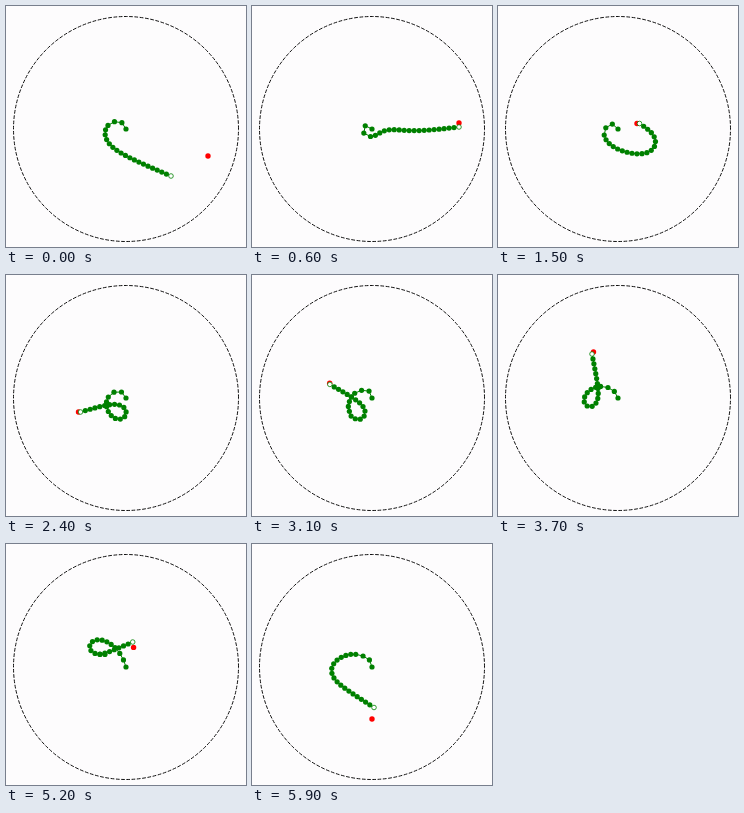
An HTML page with a canvas that plays this animation: 240x241 px, repeating every 6 s.

```html
<!DOCTYPE html>
<html>
<head>
<meta charset="utf-8">
<title>Chain reaching for a target</title>
<style>
html, body { margin: 0; width: 100%; height: 100%; overflow: hidden; background: #fdfcfd; }
canvas { display: block; }
</style>
</head>
<body>
<canvas id="stage" width="240" height="241"></canvas>
<script>
const ctx = document.getElementById('stage').getContext('2d');
const LOOP = 6000, STEP = 100;
const ROOT = [120, 123], REACH = 112.5;
const GREEN = '#008000', PAPER = '#fdfcfd';
const lengths = Array.from({ length: 21 }, (_, i) => i < 3 ? 7.5 : 5);

// time, target x y, tip x y, then in degrees: first angle, bend at the root,
// turn of the loop, and last the link at the middle of the loop
const keys = [
  [0, 202, 150, 165, 170, -118, -170, -50, 4.7],
  [600, 207, 117, 207, 121, -162, -380, 178, 5],
  [1500, 139, 117.5, 141.5, 117.5, -140, -210, -165, 14.5],
  [2400, 72.5, 137, 74.5, 137, -130, -190, -238, 10],
  [3700, 95.5, 77, 94, 79, -113, -120, -225, 8.5],
  [4500, 129, 48, 126, 48, -86, -20, -330, 8.6],
  [5900, 120, 175, 122, 163.5, -120, -100, -105, 8.7]
];

// Smooth curve through the keys
function sample(t) {
  const last = keys.length - 1;
  let i = 0;
  while (i < last - 1 && t > keys[i + 1][0]) i++;
  const a = keys[i], b = keys[i + 1], span = b[0] - a[0], u = (t - a[0]) / span;
  const slope = (k, c) => {
    const p = keys[Math.max(0, k - 1)], n = keys[Math.min(last, k + 1)];
    return (n[c] - p[c]) / (n[0] - p[0]) * span;
  };
  return a.slice(1).map((v, j) => {
    const c = j + 1, d = b[c] - v, m = slope(i, c), n = slope(i + 1, c);
    return v + u * (m + u * (3 * d - 2 * m - n + u * (m + n - 2 * d)));
  });
}

// Point at the given distance from a, in the direction of b
function along(a, b, dist) {
  const dx = b[0] - a[0], dy = b[1] - a[1], k = dist / (Math.hypot(dx, dy) || 1);
  return [a[0] + dx * k, a[1] + dy * k];
}

function chain(tip, first, bend, turn, middle) {
  const n = lengths.length;
  let joints = [ROOT];
  lengths.forEach((len, i) => {
    const degrees = first + bend * (1 - Math.exp(-i / 3)) + turn / (1 + Math.exp((middle - i) / 1.3));
    const a = degrees * Math.PI / 180, [x, y] = joints[i];
    joints.push([x + len * Math.cos(a), y + len * Math.sin(a)]);
  });
  // Spread the tip error over the chain, then restore the link lengths
  const ex = tip[0] - joints[n][0], ey = tip[1] - joints[n][1];
  joints = joints.map(([x, y], i) => [x + ex * i / n, y + ey * i / n]);
  for (let pass = 0; pass < 12; pass++) {
    joints[n] = tip;
    for (let i = n - 1; i >= 0; i--) joints[i] = along(joints[i + 1], joints[i], lengths[i]);
    joints[0] = ROOT;
    for (let i = 0; i < n; i++) joints[i + 1] = along(joints[i], joints[i + 1], lengths[i]);
  }
  return joints;
}

function dot([x, y], r, fill) {
  ctx.beginPath();
  ctx.arc(x, y, r, 0, 2 * Math.PI);
  ctx.fillStyle = fill;
  ctx.fill();
}

function draw(t) {
  const [targetX, targetY, tipX, tipY, ...pose] = sample(t);
  const joints = chain([tipX, tipY], ...pose);

  ctx.fillStyle = PAPER;
  ctx.fillRect(0, 0, 240, 241);

  ctx.lineWidth = 1;
  ctx.strokeStyle = '#111';
  ctx.setLineDash([3.7, 1.6]);
  ctx.beginPath();
  ctx.arc(...ROOT, REACH, 0, 2 * Math.PI, true);
  ctx.stroke();
  ctx.setLineDash([]);

  dot([targetX, targetY], 2.7, '#f00');
  ctx.strokeStyle = GREEN;
  ctx.beginPath();
  joints.forEach(p => ctx.lineTo(...p));
  ctx.stroke();
  joints.slice(0, -1).forEach(p => dot(p, 2.6, GREEN));
  dot(joints[joints.length - 1], 2.3, '#fff');
  ctx.lineWidth = 0.8;
  ctx.stroke();
}

const start = performance.now();
function frame() {
  const t = (performance.now() - start) % LOOP;
  draw(Math.floor(t / STEP) * STEP);
  requestAnimationFrame(frame);
}
frame();
</script>
</body>
</html>
```
